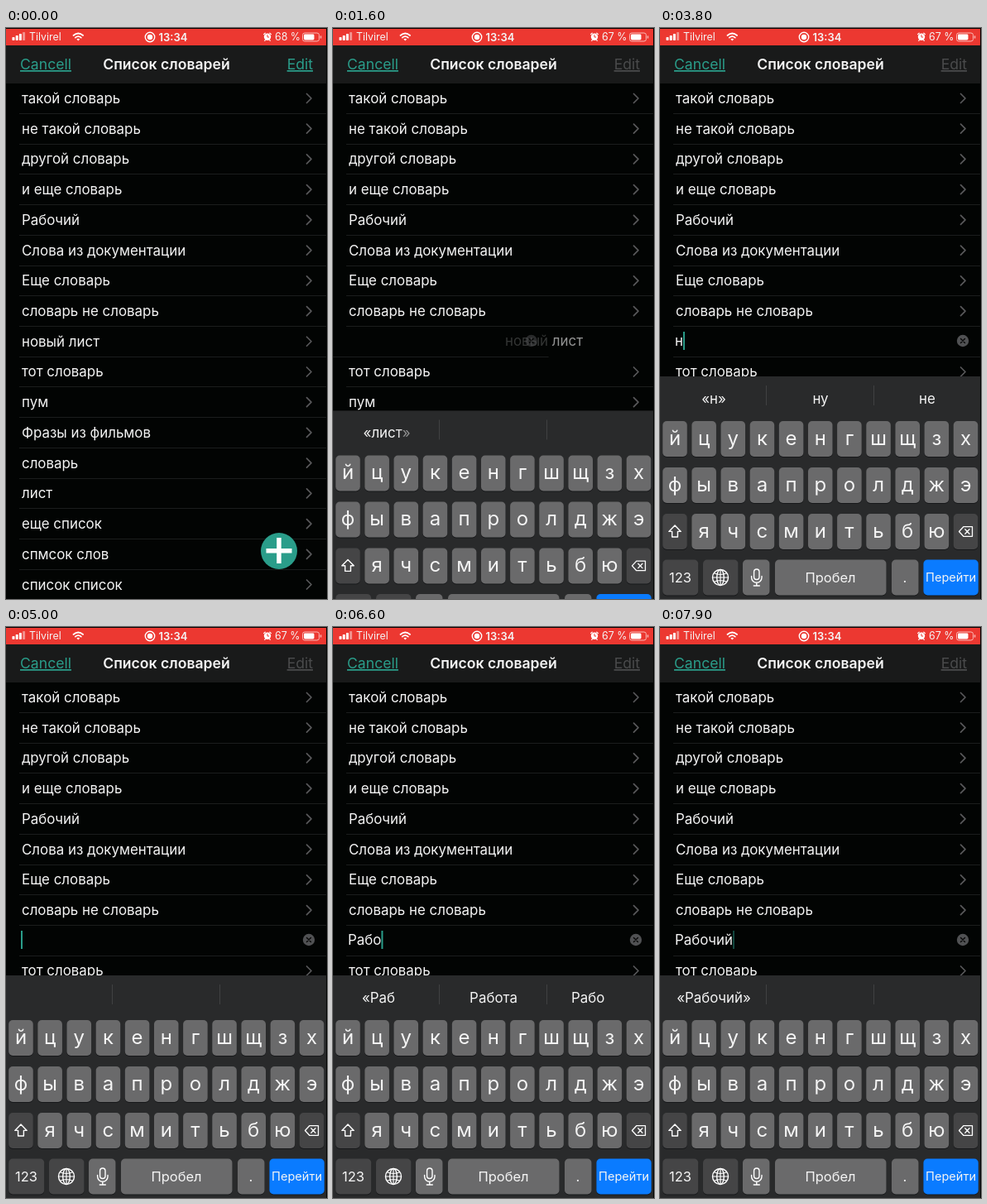
An HTML page for the animation above (8000 ms loop, 388 px wide and 690 px high).

```html
<!DOCTYPE html>
<html lang="ru">
<head>
<meta charset="utf-8">
<title>Список словарей</title>
<style>
html, body { margin: 0; height: 100%; overflow: hidden; background: #020403; }
svg { display: block; width: 388px; height: 690px; }
text { font: 16.9px Inter, "Open Sans", sans-serif; fill: #f4f4f4; white-space: pre; }
.mid { text-anchor: middle; }
.nav { font-size: 17.6px; }
.link { fill: #2a9d8a; text-decoration: underline; }
.bold { font-weight: 600; }
.key { font-size: 24px; text-anchor: middle; }
.line { fill: none; stroke: #fff; stroke-width: 1.4; stroke-linecap: round; stroke-linejoin: round; }
</style>
</head>
<body>
<svg id="stage" viewBox="0 0 388 690"></svg>
<script>
const LOOP = 8000, OPEN = 1400, ROW = 36.72, EDITED = 8;
const TEAL = '#2a9d8a', KEY = '#6a6a6b', DARK = '#454546', RED = '#ec3831';
const stage = document.getElementById('stage');

function el(parent, tag, attrs = {}, text) {
  const node = document.createElementNS('http://www.w3.org/2000/svg', tag);
  set(node, attrs);
  if (text !== undefined) node.textContent = text;
  parent.appendChild(node);
  return node;
}
function set(node, attrs) {
  for (const k in attrs) node.setAttribute(k, attrs[k]);
}
const rect = (p, x, y, width, height, fill, rx = 0) => el(p, 'rect', {x, y, width, height, fill, rx});
const label = (p, x, y, text, cls = '', style = '') => el(p, 'text', {x, y, class: cls, style}, text);
const line = (p, d, style = '') => el(p, 'path', {d, class: 'line', style});
const show = (node, on) => { node.style.display = on ? '' : 'none'; };
const clamp = v => Math.max(0, Math.min(1, v));

// List
const names = ['такой словарь', 'не такой словарь', 'другой словарь', 'и еще словарь', 'Рабочий',
  'Слова из документации', 'Еще словарь', 'словарь не словарь', 'новый лист', 'тот словарь', 'пум',
  'Фразы из фильмов', 'словарь', 'лист', 'еще список', 'спмсок слов', 'список список'];
const rows = names.map((name, i) => {
  const g = el(stage, 'g'), y = 85 + ROW * i;
  label(g, 19, y + 6, name);
  line(g, `M363.5 ${y - 5.5}l5.5 5.5l-5.5 5.5`, 'stroke:#58585a;stroke-width:1.7');
  return {g, rule: rect(stage, 16, Math.round(y + 18), 372, 1, '#1b1d1d')};
});

// Inline editor
const editor = el(stage, 'g');
const field = label(editor, 18, 384, '');
const first = el(field, 'tspan'), rest = el(field, 'tspan');
const caret = rect(editor, 18, 367, 2, 22, TEAL);
const clear = el(editor, 'g');
el(clear, 'circle', {r: 7.2, fill: '#505153'});
line(clear, 'M-2.5-2.5l5 5m0-5l-5 5', 'stroke:#080808');

// Add button
const add = el(stage, 'g');
el(add, 'circle', {cx: 330, cy: 632, r: 22, fill: TEAL});
rect(add, 314.5, 629, 31, 5.5, '#fff');
rect(add, 327.2, 616, 5.5, 31, '#fff');

// Status and navigation bars
rect(stage, 0, 1, 388, 20, RED);
rect(stage, 0, 21, 388, 46, '#191a1a');
for (let i = 0; i < 4; i++) {
  const h = 4 + 2 * i;
  rect(stage, 7.5 + 4.2 * i, 15 - h, 3, h, i < 3 ? '#fff' : '#f2918d', .7);
}
label(stage, 28, 15.3, 'Tilvirel', '', 'font-size:12.4px');
line(stage, 'M81.5 9q5.8-5 11.6 0M83.8 11.6q3.5-3 7 0', 'stroke-width:1.8');
el(stage, 'path', {d: 'M85.4 13.4q1.9-1.5 3.8 0l-1.9 2z', fill: '#fff'});
el(stage, 'circle', {cx: 174, cy: 11, r: 5.7, class: 'line'});
el(stage, 'circle', {cx: 174, cy: 11, r: 3.2, fill: '#fff'});
label(stage, 202, 15.5, '13:34', 'mid bold', 'font-size:13px');
el(stage, 'circle', {cx: 316, cy: 10.7, r: 4.2, fill: '#fff'});
line(stage, 'M311.6 7.6l1.6-1.4M320.4 7.6l-1.6-1.4M313.4 14.6l-.7.8M318.6 14.6l.7.8', 'stroke-width:1.2');
line(stage, 'M316 8.5v2.5h1.8', `stroke:${RED};stroke-width:1`);
const charge = label(stage, 325, 15.3, '', '', 'font-size:12.4px');
el(stage, 'rect', {x: 358.5, y: 6, width: 20, height: 10, rx: 2.6, fill: 'none', stroke: '#f9b9b6'});
rect(stage, 360, 7.5, 12.5, 7, '#fff', 1.4);
rect(stage, 379.8, 9.2, 1.5, 3.6, '#f9b9b6', .7);
label(stage, 17, 50, 'Cancell', 'nav link');
label(stage, 194, 50, 'Список словарей', 'nav mid bold');
const edit = label(stage, 371, 50, 'Edit', 'nav link', 'text-anchor:end');

// Keyboard
const board = el(stage, 'g');
rect(board, 0, 421, 388, 269, '#292a2b');
rect(board, 128, 432, 1, 24, '#404142');
rect(board, 258, 432, 1, 24, '#404142');
const hints = [65, 194, 323].map(x => label(board, x, 453.5, '', 'mid'));

function key(x, y, w, fill) {
  rect(board, x, y + 1, w, 43, '#17181a', 5);
  return rect(board, x, y, w, 43, fill, 5);
}
const keyX = slot => 3.2 + 35.15 * slot;
const caps = {};
['йцукенгшщзх', 'фывапролджэ', 'ячсмитьбю'].forEach((letters, r) => {
  [...letters].forEach((ch, i) => {
    const x = keyX(i + (r === 2)), y = 475 + 56 * r;
    key(x, y, 29.6, KEY);
    caps[ch] = {x, y, text: label(board, x + 14.8, y + 29, ch, 'key')};
  });
});
const shiftKey = key(keyX(0), 587, 29.6, DARK);
const arrow = line(board, 'M18 601l-7.2 7.4h3.8v6.6h6.8v-6.6h3.8z');
key(keyX(10), 587, 29.6, DARK);
line(board, 'M361.5 608.5l5.3-5.8h10.7v11.6h-10.7zM368.8 605.8l5.2 5.4m0-5.4l-5.2 5.4', 'stroke-width:1.3');
key(3.2, 642.5, 43, DARK);
key(52, 642.5, 42.5, DARK);
key(100, 642.5, 32.5, KEY);
key(139, 642.5, 134.5, KEY);
key(280, 642.5, 32.5, KEY);
key(318.4, 642.5, 66.4, '#0a7bff');
label(board, 24.5, 670, '123', 'mid', 'font-size:16.5px');
label(board, 206, 669.5, 'Пробел', 'mid', 'font-size:16.5px');
label(board, 296, 670, '.', 'mid');
label(board, 351.6, 669, 'Перейти', 'mid', 'font-size:14.6px');
el(board, 'circle', {cx: 73, cy: 664, r: 9.5, class: 'line'});
el(board, 'ellipse', {cx: 73, cy: 664, rx: 4.3, ry: 9.5, class: 'line'});
line(board, 'M73 654.5v19M63.5 664h19M65.5 658.8q7.5 3.4 15 0M65.5 669.2q7.5-3.4 15 0', 'stroke-width:1.2');
el(board, 'rect', {x: 113.6, y: 654, width: 6.4, height: 12.5, rx: 3.2, class: 'line'});
line(board, 'M110.6 662.5v1.5a6.2 6.2 0 0 0 12.4 0v-1.5M116.8 670.3v3.7M113.3 674h7');

const popup = el(board, 'g');
const bubble = el(popup, 'path', {fill: KEY});
const popupText = label(popup, 0, 0, '', 'mid', 'font-size:34px');

function drawPopup(ch, upper) {
  const {x, y} = caps[ch], top = y - 68, end = x + 29.6;
  const left = x < 10 ? x : x - 13, right = x < 10 ? x + 57 : end + 13;
  set(bubble, {d: `M${left + 9} ${top}H${right - 9}q9 0 9 9V${top + 40}
    C${right} ${top + 56} ${end} ${top + 54} ${end} ${top + 70}V${y + 38}q0 5-5 5H${x + 5}q-5 0-5-5V${top + 70}
    C${x} ${top + 54} ${left} ${top + 56} ${left} ${top + 40}V${top + 9}q0-9 9-9z`});
  set(popupText, {x: (left + right) / 2, y: top + 43});
  popupText.textContent = upper ? ch.toUpperCase() : ch;
}

// Dark edges of the screen
rect(stage, 387, 0, 1, 690, '#020403');

// Typing script: key presses and the resulting text
const presses = [['р', 5680, 5800], ['а', 5950, 6060], ['б', 6230, 6340], ['о', 6460, 6570],
  ['ч', 6680, 6790], ['и', 6850, 6960], ['й', 7170, 7290]];
const SHIFT_ON = 5100, SHIFT_OFF = 5800;
const before = 'новый лист', after = 'Рабочий';
const guesses = {
  'лист': ['листа', 'листок'], 'ли': ['или', 'лишь'], 'л': ['лет', 'ли'],
  'новый': ['новый', 'новые'], 'новы': ['новый', 'новые'], 'нов': ['новый', 'нового'],
  'но': ['но', 'новый'], 'н': ['ну', 'не'], 'Р': ['Велирад', 'Др'], 'Ра': ['Раз', 'Работа'],
  'Раб': ['Работа', 'Работы'], 'Рабо': ['Работа', 'Рабочий'], 'Рабоч': ['Рабочий', 'Рабочая'],
  'Рабочи': ['Рабочий', 'Рабочие']
};
function suggest(text) {
  let word = text.split(' ').pop();
  if (word === 'лис') word = 'лист';
  return word ? ['«' + word + '»', ...(guesses[word] || ['', ''])] : ['', '', ''];
}
const edits = [];
const addEdit = (time, text, words = suggest(text)) => edits.push({time, text, words});
addEdit(0, before, ['', '', '']);
addEdit(1445, before, ['«лист»', '', '']);
addEdit(1720, before);
addEdit(2550, before.slice(0, 9));
for (let n = 8; n > 0; n--) addEdit(2800 + 110 * (8 - n), before.slice(0, n));
addEdit(3950, '');
presses.forEach((p, i) => addEdit(p[2], after.slice(0, i + 1)));

// Changed letters fade in one after another
function drawHint(node, word, old, age) {
  node.textContent = '';
  [...word].forEach((ch, i) => {
    const a = ch === old[i] ? 1 : clamp((age - 25 * i) / 60);
    el(node, 'tspan', {'fill-opacity': a}, ch);
  });
}
function blink(age) {
  const d = age % 1000;
  return d < 500 ? 1 : d < 850 ? clamp((700 - d) / 200) : (d - 850) / 150;
}

function draw(t) {
  const open = t >= OPEN, p = clamp((t - OPEN) / 400), q = 1 - p;
  show(rows[EDITED].g, !open);
  show(add, !open);
  show(editor, open);
  show(board, open);
  charge.textContent = open ? '67 %' : '68 %';
  edit.style.fill = open ? '#4a4b4c' : TEAL;
  const inset = open ? 16 * clamp(2 * p - 1) : 16;
  set(rows[EDITED].rule, {x: inset, width: 388 - inset - (open ? 256 * q : 0)});
  if (!open) return;

  set(board, {transform: `translate(0 ${269 * q ** 2.68})`});
  const at = edits.findLastIndex(e => e.time <= t), now = edits[at], age = t - now.time;
  const old = at ? edits[at - 1].words : ['', '', ''];
  hints.forEach((node, i) => drawHint(node, now.words[i], old[i], age - 36 * i));

  first.textContent = now.text.slice(0, 5);
  rest.textContent = now.text.slice(5);
  set(first, {'fill-opacity': clamp((t - 1540) / 300)});
  set(rest, {'fill-opacity': clamp((t - 1420) / 300)});
  const x = 18 + 382 * q;
  set(field, {x});
  set(clear, {transform: `translate(${366 - 254 * q} 378)`, opacity: p});
  set(caret, {x: x + field.getComputedTextLength(), opacity: p < 1 ? 0 : blink(age)});

  const upper = t >= SHIFT_ON && t < SHIFT_OFF;
  for (const ch in caps) caps[ch].text.textContent = upper ? ch.toUpperCase() : ch;
  set(shiftKey, {fill: upper ? '#e8e8e8' : DARK});
  arrow.style.cssText = upper ? 'fill:#111;stroke:#111' : '';
  const press = presses.find(k => t >= k[1] && t < k[2]);
  show(popup, !!press);
  if (press) drawPopup(press[0], upper);
}

function tick() {
  draw(performance.now() % LOOP);
  requestAnimationFrame(tick);
}
tick();
</script>
</body>
</html>
```
